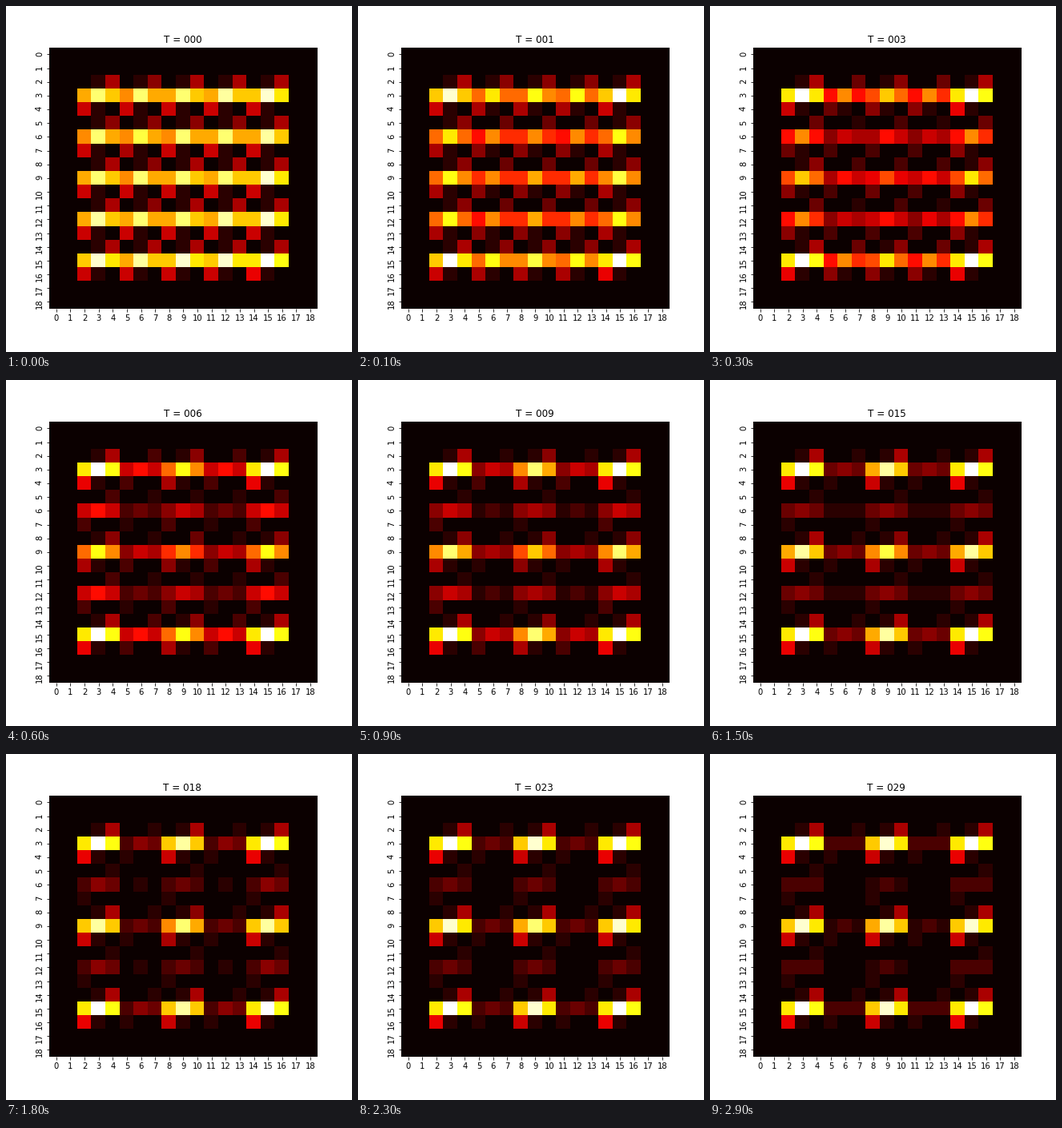
Recreate the animation shown at these times as a matplotlib script. Size 432 px wide and 432 px high, loop 3 s.

```python
import numpy as np
import matplotlib.pyplot as plt
from matplotlib.animation import FuncAnimation

FRAMES, INTERVAL = 30, 100
STAGE, SIZE, PAD, LEVELS = 432, 19, 2, 22
LEFT, BOTTOM, WIDTH, HEIGHT = 0.125, 0.125, 0.775, 0.755

# Response of one 3x3 block, repeated on a 5x5 lattice.
BLOCK = np.array([[0.0, 0.055, 0.27],
                  [0.705, 1.0, 0.745],
                  [0.328, 0.065, 0.0]])


def weights(t):
    """Odd blocks fade like 1/t; the middle one dips, then recovers."""
    start = np.exp(-t / 2)
    first = 1 - 0.072 * start
    odd = 1 / (1.11 + 0.228 * t)
    middle = 1 - 1.75 * t / (t * t + 9) - 0.075 * start
    return np.array([first, odd, middle, odd + 0.03 * start, 1.0])


def grid(t):
    w = weights(t)
    values = np.pad(np.kron(np.outer(w, w), BLOCK), PAD)
    steps = np.floor(values * LEVELS)
    steps = np.maximum(steps, values > 0.0338)  # keep faint cells visible
    return np.clip(steps, 0, LEVELS - 1)


def pixel_edges(start, length):
    """Cell edges in data units, cut down to whole pixels."""
    cell = length * STAGE / SIZE
    start *= STAGE
    return (np.floor(start + cell * np.arange(SIZE + 1)) - start) / cell


plt.rcParams.update({"font.family": "DejaVu Sans", "font.size": 10})
fig = plt.figure(figsize=(6, 6), dpi=72, facecolor="white")
cmap = plt.get_cmap("hot", LEVELS)
ax = fig.add_axes([LEFT, BOTTOM, WIDTH, HEIGHT], facecolor=cmap(0))
mesh = ax.pcolormesh(pixel_edges(LEFT, WIDTH),
                     pixel_edges(1 - BOTTOM - HEIGHT, HEIGHT),
                     grid(0), cmap=cmap, vmin=-0.5, vmax=LEVELS - 0.5)
ax.set(xlim=(0, SIZE), ylim=(SIZE, 0))
centers = np.arange(SIZE) + 0.5
ax.set_xticks(centers, range(SIZE))
ax.set_yticks(centers, range(SIZE), rotation=90)
for spine in ax.spines.values():
    spine.set_visible(False)
title = ax.set_title("T = 000", fontsize=12, pad=6, x=0.497)


def update(t):
    mesh.set_array(grid(t))
    title.set_text(f"T = {t:03d}")
    return mesh, title


anim = FuncAnimation(fig, update, frames=FRAMES, interval=INTERVAL,
                     repeat=True, repeat_delay=0)
plt.show()
```
